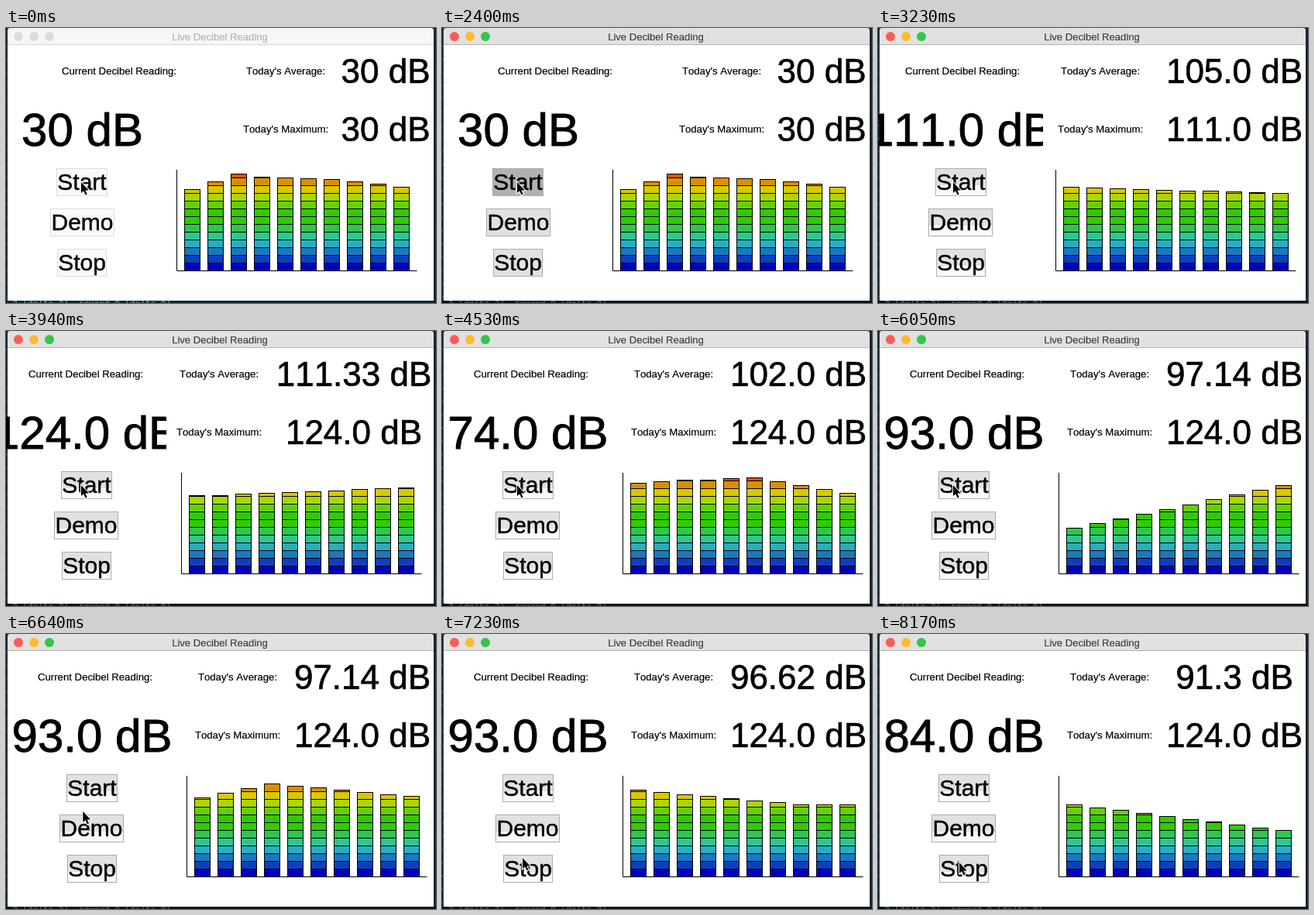
Animation, 555 px wide and 355 px high, one loop 9250 ms. Source, as an HTML page with a canvas:

```html
<!DOCTYPE html>
<html lang="en">
<head>
<meta charset="utf-8">
<title>Live Decibel Reading</title>
<style>
  html, body { margin: 0; width: 100%; height: 100%; overflow: hidden; background: #0b2630; }
  canvas { display: block; }
</style>
</head>
<body>
<canvas id="stage" width="555" height="355"></canvas>
<script>
const ctx = document.getElementById('stage').getContext('2d');
const LOOP = 9250, ACTIVE = 2400, RELEASE = 2640, SECOND = 2760, RUN = 3230, STEP = 117.62;
const SANS = '"Liberation Sans", Arial, sans-serif', MONO = '"Liberation Mono", monospace';

// Decibel readings; the chart interpolates ten bars between neighbours.
const readings = [108, 99, 111, 124, 74, 59, 120, 93, 93, 56, 84];
const idleBars = [105, 115, 125, 121, 120, 119, 118, 115, 112, 108];
const segmentColors = ['#0000bf', '#0d3fc0', '#1a78c2', '#28aec0', '#2dc78e', '#2dc74c', '#30cb00',
  '#30ca00', '#66d000', '#a9d700', '#d7c800', '#d99000', '#d85600'];

// Chart scroll position and pointer, keyed by step.
const scrollKeys = [[0, 0], [6, 11], [7, 20], [17, 32], [24, 50], [34, 63], [42, 80]];
const pointerX = [[27, 97], [33, 104], [38, 104], [40, 105]];
const pointerY = [[27, 199], [33, 289], [38, 289], [40, 295]];

// Column centres: buttons and big number, its caption, middle captions, right numbers.
const layouts = {
  idle: [98.5, 146, 361, 490],
  first: [111, 127, 323, 471],
  tight: [104, 103, 275, 449],
  medium: [107, 109, 287, 460],
  normal: [111, 115, 299, 460]
};

function track(keys, x) {
  if (x <= keys[0][0]) return keys[0][1];
  for (let i = 1; i < keys.length; i++) {
    const [x0, y0] = keys[i - 1], [x1, y1] = keys[i];
    if (x <= x1) return y0 + (y1 - y0) * (x - x0) / (x1 - x0);
  }
  return keys[keys.length - 1][1];
}

function level(position) {
  const i = Math.floor(position / 10), next = readings[Math.min(i + 1, readings.length - 1)];
  return readings[i] + (next - readings[i]) * (position % 10) / 10;
}

// A thin outline gives the letters the heavier look of smoothed screen text.
function text(string, x, y, size, color = '#000', family = SANS) {
  ctx.font = `${size}px ${family}`;
  ctx.fontKerning = 'none';
  ctx.textAlign = 'center';
  ctx.fillStyle = ctx.strokeStyle = color;
  ctx.lineWidth = size * 0.015;
  ctx.fillText(string, x, y);
  ctx.strokeText(string, x, y);
}

function rect(x, y, w, h, fill) {
  ctx.fillStyle = fill;
  ctx.fillRect(x, y, w, h);
}

const decibels = v => (Number.isInteger(v) ? v.toFixed(1) : v) + ' dB';

function stateAt(t) {
  const step = Math.min(42, Math.floor((t - RUN + 8) / STEP));
  const scroll = Math.round(track(scrollKeys, step));
  const count = t < RELEASE ? 0 : t < SECOND ? 1 : Math.floor(scroll / 10) + 2;
  const bars = step < 0 ? idleBars : idleBars.map((_, i) => level(scroll + i));
  const state = { step, bars, active: t >= ACTIVE, running: count > 0, pressed: '' };
  if (t >= ACTIVE && t < RELEASE) state.pressed = 'Start';
  if (step === 40 || step === 41) state.pressed = 'Stop';
  if (!count) {
    state.now = state.average = state.maximum = '30 dB';
    state.layout = layouts.idle;
    return state;
  }
  const taken = readings.slice(1, count + 1), now = taken[count - 1];
  const sum = taken.reduce((a, b) => a + b);
  state.now = decibels(now);
  state.average = decibels(Math.floor(sum * 100 / count) / 100);
  state.maximum = decibels(Math.max(...taken));
  state.layout = layouts[count === 1 ? 'first' : now < 100 ? 'normal' : count === 3 ? 'tight' : 'medium'];
  return state;
}

function drawWindow(active) {
  rect(0, 0, 555, 355, '#0b2630');
  rect(0, 352, 555, 3, active ? '#04141a' : '#0b2630');
  for (let y = 22; y < 350; y += 17) rect(0, y, 1, 3, '#3d545c');
  text('l 3 (delta 2), reused 0 (delta 0)', 104, 359, 11, active ? '#5d6f75' : '#839496', MONO);
  ctx.beginPath();
  ctx.roundRect(2, 0, 550, 352, [4, 4, 0, 0]);
  ctx.save();
  ctx.clip();
  rect(2, 0, 550, 352, '#fff');
  rect(2, 0, 550, 21, active ? '#e1e1e1' : '#f6f6f6');
  rect(2, 21, 550, 1, active ? '#b3b3b3' : '#d6d6d6');
  ctx.restore();
  ['#fc5b57', '#fdbb2e', '#34c648'].forEach((color, i) => {
    ctx.beginPath();
    ctx.arc(16 + 20 * i, 11, 6, 0, 7);
    ctx.fillStyle = active ? color : '#dcdcdc';
    ctx.fill();
  });
  text('Live Decibel Reading', 276, 16, 13.1, active ? '#404040' : '#b4b4b4');
}

function drawButton(label, center, y, width, { active, running, pressed }) {
  const x = Math.floor(center - width / 2);
  const face = pressed === label ? '#b1b1b1' : active ? '#e1e1e1' : '#fafafa';
  rect(x, y, width, 36, active ? '#adadad' : '#dcdcdc');
  rect(x + 1, y + 1, width - 2, 34, face);
  if (running && pressed !== label) rect(x + 1, y + 22, width - 2, 13, '#fafafa');
  text(label, x + width / 2, y + 28, 30);
}

function drawChart(x, bars) {
  const base = 313.5;
  ctx.strokeStyle = '#000';
  ctx.lineWidth = 1;
  bars.forEach((height, i) => {
    const left = x + 10 + 30 * i;
    for (let s = 0; s * 10 < height; s++) {
      const h = Math.max(1, Math.ceil(Math.min(10, height - s * 10) - 0.5)), top = base - s * 10 - h;
      ctx.fillStyle = segmentColors[s];
      ctx.fillRect(left, top, 20, h);
      ctx.strokeRect(left, top, 20, h);
    }
  });
  ctx.beginPath();
  ctx.moveTo(x, 183);
  ctx.lineTo(x, base);
  ctx.lineTo(x + 310, base);
  ctx.stroke();
}

function drawPointer(x, y) {
  ctx.save();
  ctx.translate(x, y);
  const arrow = new Path2D('M0 0V14L3.1 11.2L5.6 16.6L7.7 15.6L5.3 10.4H9.8Z');
  ctx.strokeStyle = '#fff';
  ctx.lineWidth = 2;
  ctx.stroke(arrow);
  ctx.fillStyle = '#000';
  ctx.fill(arrow);
  ctx.restore();
}

function draw(t) {
  const state = stateAt(t), [left, caption, middle, right] = state.layout;
  drawWindow(state.active);

  text('Current Decibel Reading:', caption, 60, 13.2);
  text("Today's Average:", middle, 60, 13.2);
  text("Today's Maximum:", middle, 135, 13.2);
  text(state.average, right, 71, 44);
  text(state.maximum, right, 146, 44);

  ctx.save();
  ctx.beginPath();
  ctx.rect(0, 90, Math.round(left * 2) - 1, 80);
  ctx.clip();
  text(state.now, left, 152, 60);
  ctx.restore();

  drawButton('Start', left, 181, 66, state);
  drawButton('Demo', left, 233, 83, state);
  drawButton('Stop', left, 285, 64, state);
  drawChart(Math.floor(left + 122) + 0.5, state.bars);
  drawPointer(track(pointerX, state.step), track(pointerY, state.step));
}

const start = performance.now();
function frame() {
  draw((performance.now() - start) % LOOP);
  requestAnimationFrame(frame);
}
frame();
</script>
</body>
</html>
```
